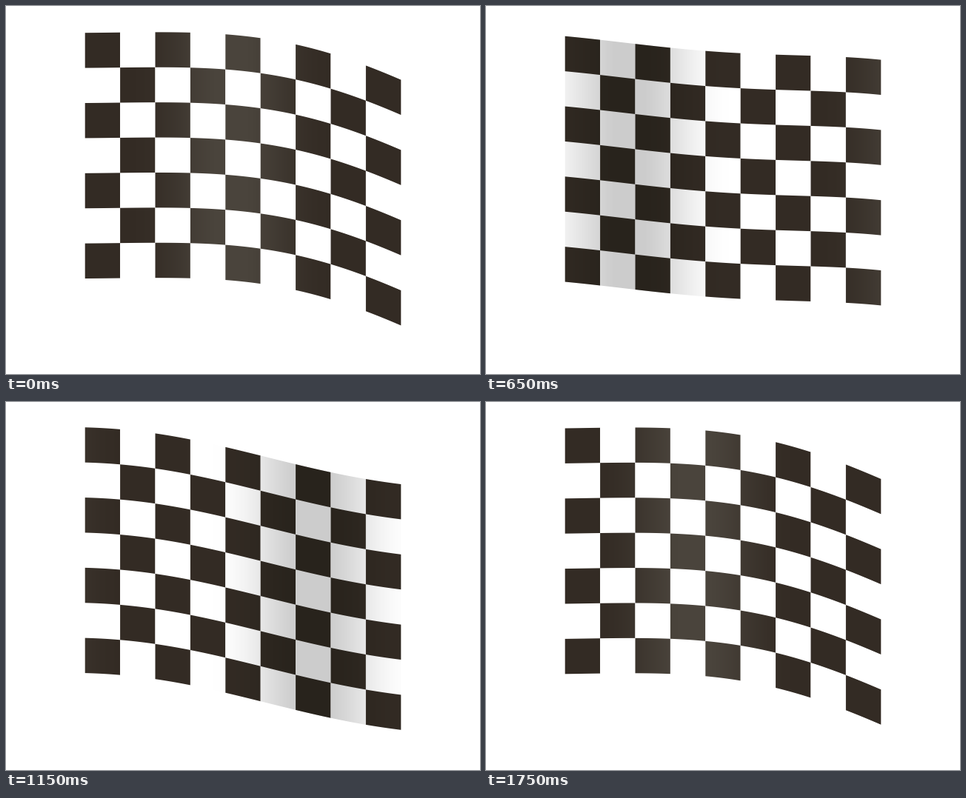
These frames come from a looping animation (640 px wide and 497 px high, 1800 ms). An HTML page with a canvas:

```html
<!DOCTYPE html>
<html lang="en">
<head>
<meta charset="utf-8">
<title>Chequered flag</title>
<style>
  html, body { margin: 0; width: 100%; height: 100%; overflow: hidden; background: #fff; }
  canvas { display: block; }
</style>
</head>
<body>
<canvas id="stage" width="640" height="497"></canvas>
<script>
const ctx = document.getElementById('stage').getContext('2d');
const LOOP = 1800, STEP = 50, TAU = Math.PI * 2;
const CELL = 47.4, COLS = 9, ROWS = 7;
const WIDTH = CELL * COLS, LEFT = 320 - WIDTH / 2;

const DARK = [51, 43, 36], DARK_LIT = [74, 68, 60], DARK_SHADE = [40, 35, 28];
const PALE = [255, 255, 255], PALE_SHADE = [204, 204, 204];

const mix = (a, b, k) => `rgb(${a.map((v, i) => Math.round(v + (b[i] - v) * k)).join(',')})`;

// Top edge: a sagging curve plus a travelling wave that grows to the right.
function topEdge(x, t) {
  const u = (x - LEFT) / WIDTH;
  const sag = 37 + 14.2 * u + 43.7 * u * u;
  const swing = 4.3 + 21.2 * u;
  return sag + swing * Math.cos(TAU * (t - 502 - 902 * u) / LOOP);
}

// Strength of a light or shadow band for a cosine in -1..1.
const band = c => Math.min(1, 1.06 * Math.pow(Math.max(0, (c - 0.35) / 0.65), 3));

// One pixel-wide strip of a column, narrower where the column edge cuts it.
function drawStrip(x, width, col, t) {
  const mid = x + width / 2;
  const c = Math.cos(TAU * ((mid - 304) / 792 - t / LOOP));
  const shade = band(-c);
  const top = topEdge(mid, t);
  ctx.fillStyle = mix(PALE, PALE_SHADE, shade);
  ctx.fillRect(x, top, width, CELL * ROWS);
  ctx.fillStyle = c > 0 ? mix(DARK, DARK_LIT, band(c)) : mix(DARK, DARK_SHADE, shade);
  for (let row = col % 2; row < ROWS; row += 2) {
    ctx.fillRect(x, top + row * CELL, width, CELL);
  }
}

function draw(t) {
  ctx.fillStyle = '#fff';
  ctx.fillRect(0, 0, 640, 497);
  for (let col = 0; col < COLS; col++) {
    const from = LEFT + col * CELL, to = from + CELL;
    for (let px = Math.floor(from); px < to; px++) {
      const x = Math.max(px, from);
      drawStrip(x, Math.min(px + 1, to) - x, col, t);
    }
  }
}

let start = null;
function tick(now) {
  if (start === null) start = now;
  draw(Math.floor(((now - start) % LOOP) / STEP) * STEP);
  requestAnimationFrame(tick);
}
draw(0);
requestAnimationFrame(tick);
</script>
</body>
</html>
```
